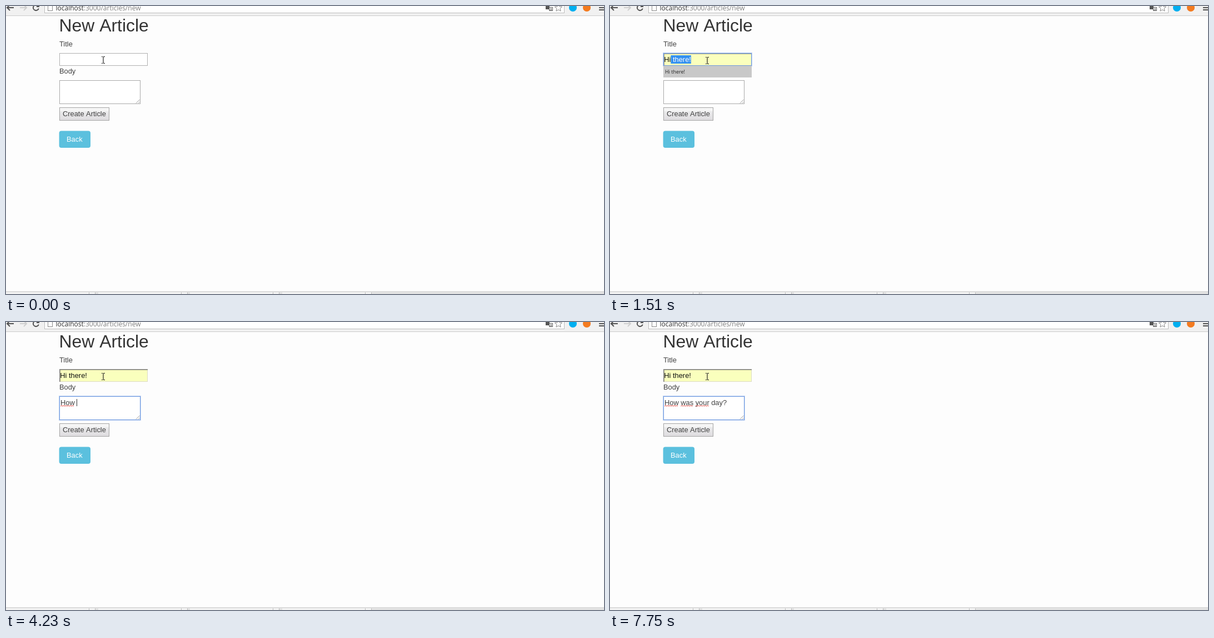
Recreate the animation shown at these times as an HTML page with a canvas. Size 1076 px wide and 520 px high, loop 8000 ms.

```html
<!DOCTYPE html>
<html lang="en">
<head>
<meta charset="utf-8">
<title>New Article</title>
<style>
html, body { margin: 0; width: 100%; height: 100%; overflow: hidden; background: #fdfdfd; }
canvas { display: block; }
</style>
</head>
<body>
<canvas id="stage" width="1076" height="520"></canvas>
<script>
const ctx = document.getElementById('stage').getContext('2d');
const LOOP = 8000;
const SANS = '"Liberation Sans", Arial, sans-serif';
const UI = '"Open Sans", sans-serif';
const FORM = `12.85px ${SANS}`;

const BODY = 'How was your day?';
const KEY_TIMES = [3740, 3860, 3980, 4230, 4350, 4470, 5000, 5150, 5400,
                   5550, 5680, 5830, 6390, 6540, 6660, 7060, 7220];

const within = (t, from, to) => t >= from && t < to;

function box(x, y, w, h, color) {
  ctx.fillStyle = color;
  ctx.fillRect(x, y, w, h);
}

function frame(x, y, w, h, color) {
  ctx.strokeStyle = color;
  ctx.lineWidth = 1;
  ctx.strokeRect(x + .5, y + .5, w - 1, h - 1);
}

function text(str, x, y, color = '#404040', font = FORM) {
  ctx.font = font;
  ctx.fillStyle = color;
  ctx.fillText(str, x, y);
}

function width(str) {
  ctx.font = FORM;
  return ctx.measureText(str).width;
}

function line(points, color, lineWidth = 1) {
  ctx.strokeStyle = color;
  ctx.lineWidth = lineWidth;
  ctx.beginPath();
  points.forEach(([x, y]) => ctx.lineTo(x, y));
  ctx.stroke();
}

function disc(x, y, r, color) {
  ctx.fillStyle = color;
  ctx.beginPath();
  ctx.arc(x, y, r, 0, 7);
  ctx.fill();
}

function arrow(x, dir, color) {
  line([[x - 6 * dir, 3], [x + 5 * dir, 3]], color, 2);
  line([[x + dir, -2], [x + 6 * dir, 3], [x + dir, 8]], color, 2);
}

function focusRing(x, y, w, h) {
  frame(x - 1, y - 1, w + 2, h + 2, '#bfd2f2');
  frame(x, y, w, h, '#6f9ae0');
}

function drawToolbar() {
  box(0, 0, 1076, 17, '#f1f1f1');
  box(0, 17, 1076, 1, '#cbcbcb');
  box(69, 0, 936, 13, '#bdbdbd');
  box(70, 0, 934, 12, '#fff');

  arrow(8, -1, '#505050');
  arrow(31, 1, '#cfcfcf');
  ctx.strokeStyle = '#505050';
  ctx.lineWidth = 2;
  ctx.beginPath();
  ctx.arc(54, 3, 5, .3, 5.3);
  ctx.stroke();
  box(55, -1, 5, 3, '#505050');

  frame(75, -3, 9, 12, '#8a8a8a');
  text('localhost', 89.5, 7.5, '#333', `12px ${UI}`);
  const hostWidth = ctx.measureText('localhost').width;
  text(':3000/articles/new', 89.5 + hostWidth, 7.5, '#808080', `12px ${UI}`);

  box(971, -1, 7, 7, '#555');
  box(977, 2, 7, 7, '#fff');
  frame(977, 2, 7, 7, '#666');
  text('a', 978.3, 8, '#444', `8px ${UI}`);

  const star = [];
  for (let i = 0; i <= 10; i++) {
    const a = i * Math.PI / 5 - Math.PI / 2, r = i % 2 ? 3.2 : 7;
    star.push([994 + r * Math.cos(a), 3.5 + r * Math.sin(a)]);
  }
  line(star, '#888');

  disc(1020, 3, 7, '#00aff0');
  disc(1045, 3, 7, '#f47b20');
  for (const y of [-2, 2, 6]) box(1067, y, 9, 2, '#505050');
}

function drawShelf() {
  box(0, 515, 1076, 5, '#e2e2e2');
  box(0, 515, 1076, 1, '#d4d4d4');
  for (let i = 0; i < 4; i++) {
    const right = Math.round(161 + 165.6 * i);
    box(right - 161, 517, 160, 3, '#f3f3f3');
    box(right - 12, 517, 1, 3, '#bbb');
    box(right - 1, 517, 1, 3, '#bbb');
  }
}

function drawTitleField(t) {
  const focused = within(t, 150, 1880);
  const filled = t >= 1510;
  const selecting = within(t, 1510, 1630);
  const value = filled ? 'Hi there!' : t >= 1020 ? 'Hi' : t >= 900 ? 'H' : '';

  box(96, 85, 159, 23, filled ? '#faffbd' : '#fff');
  if (filled) {
    frame(96, 85, 159, 23, '#dcdcc4');
    box(96, 85, 159, 2, '#a3a38c');
    box(96, 85, 2, 23, '#a3a38c');
    box(96, 85, 159, 1, '#858585');
    box(96, 85, 1, 23, '#858585');
  } else {
    frame(96, 85, 159, 23, '#b0b0b0');
  }
  if (focused) focusRing(96, 85, 159, 23);

  text(value, 97.3, 101, filled ? '#111' : '#404040');
  if (selecting) {
    const start = 97.3 + width('Hi');
    box(start, 89, width(' there!'), 15, '#3390f0');
    text(' there!', start, 101, '#fff');
  }
  if (focused && !selecting && !within(t, 650, 900)) {
    box(Math.floor(97.3 + width(value)), 89, 1, 15, '#333');
  }

  if (within(t, 900, 1630)) {
    box(96, 108, 159, 21, '#c8c8c8');
    if (t < 1390) box(97, 109, 157, 19, '#fff');
    text('Hi there!', 99, 122, '#222', `9px ${UI}`);
  } else {
    text('Body', 96, 122);
  }
}

function drawBodyField(t) {
  const focused = t >= 1880;
  const typed = BODY.slice(0, KEY_TIMES.filter(k => k <= t).length);

  box(96, 134, 146, 43, '#fff');
  frame(96, 134, 146, 43, '#a9a9a9');
  if (focused) focusRing(96, 134, 146, 43);
  line([[234, 175.5], [240.5, 169]], '#999');
  line([[238, 175.5], [240.5, 173]], '#999');

  text(typed, 98, 150);
  // Spelling marks appear once a word is followed by a space.
  for (const word of typed.matchAll(/\S+(?=\s)/g)) {
    const left = 98 + width(typed.slice(0, word.index));
    const right = left + width(word[0]);
    const wave = [];
    for (let x = left, i = 0; x <= right; x += 2, i++) wave.push([x, i % 2 ? 150.8 : 152]);
    line(wave, '#e8483f');
  }

  const caretOff = within(t, 2380, 2910) || within(t, 3440, 3740) || t >= 7750;
  if (focused && !caretOff) box(Math.floor(98.2 + width(typed)), 139, 1, 13, '#333');
}

function drawButtons() {
  const shade = ctx.createLinearGradient(0, 183, 0, 206);
  shade.addColorStop(0, '#f8f8f8');
  shade.addColorStop(.3, '#f4f4f4');
  shade.addColorStop(.32, '#ebebec');
  shade.addColorStop(1, '#dedcdf');
  box(96, 183, 90, 24, shade);
  frame(96, 183, 90, 24, '#a3a3a3');
  text('Create Article', 102, 199);

  ctx.fillStyle = '#5bc0de';
  ctx.beginPath();
  ctx.roundRect(95.6, 225.6, 56.4, 30.4, 4);
  ctx.fill();
  text('Back', 109, 245, '#fff');
}

function drawPointer(t) {
  const y = t < 400 ? 91 : 92;
  for (const barY of [y, y + 12]) {
    box(172, barY, 2, 1, '#222');
    box(175, barY, 3, 1, '#222');
  }
  box(174.4, y + 1, 1.2, 11, '#222');
}

function draw(now) {
  const t = now % LOOP;
  box(0, 0, 1076, 520, '#fdfdfd');
  drawToolbar();
  drawShelf();
  text('New Article', 95.5, 46, '#333', `31.9px ${SANS}`);
  text('Title', 96, 73);
  drawTitleField(t);
  drawBodyField(t);
  drawButtons();
  drawPointer(t);
  requestAnimationFrame(() => draw(performance.now() - start));
}

const start = performance.now();
draw(0);
</script>
</body>
</html>
```
